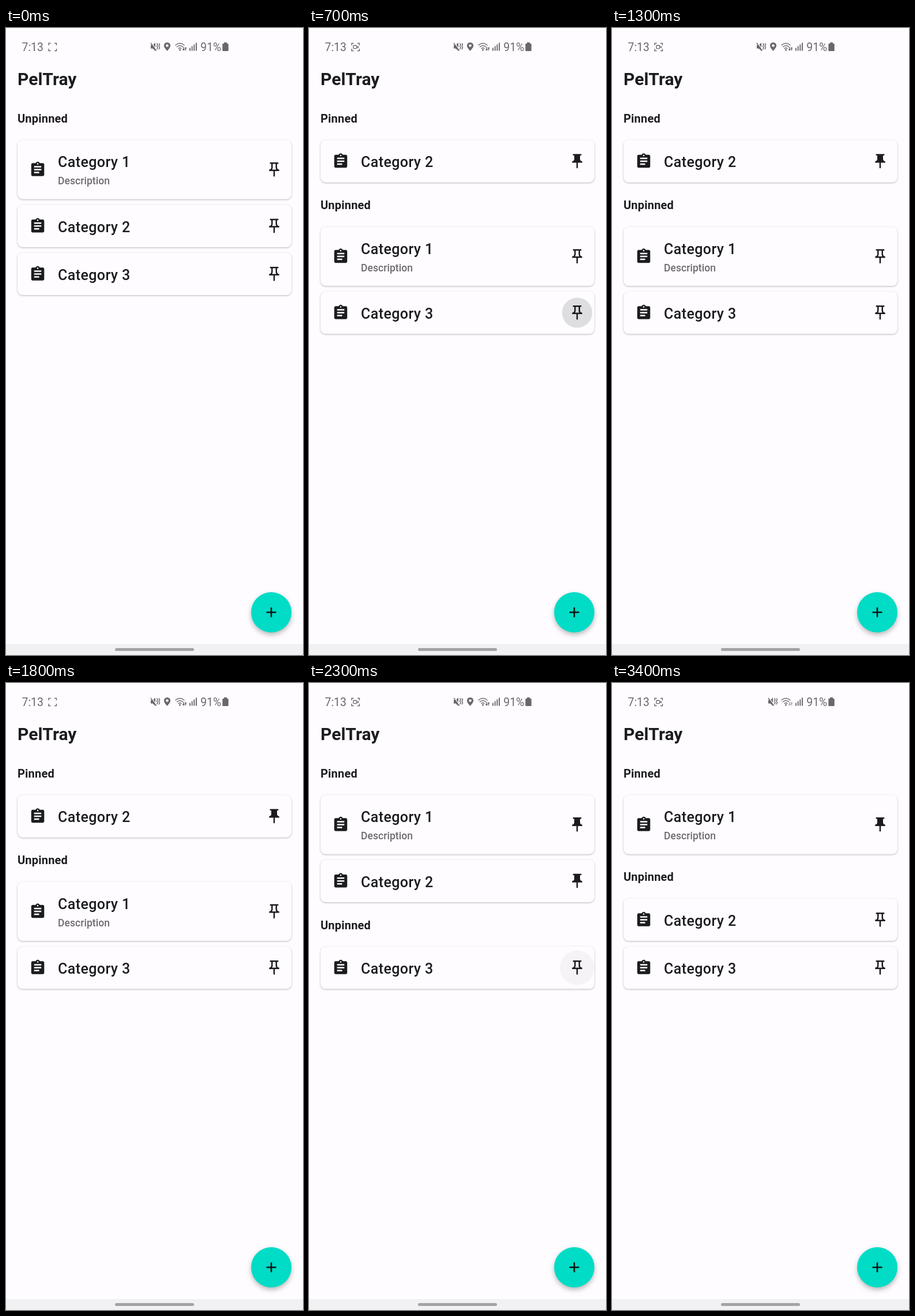
Write an HTML page that moves like this. It is 515 px wide and 1087 px high and loops after 3.8 s.

```html
<!DOCTYPE html>
<html lang="en">
<head>
<meta charset="utf-8">
<title>Pinned cards</title>
<style>
  html, body { margin: 0; width: 100%; height: 100%; overflow: hidden; background: #fefcff; }
  svg { display: block; width: 100vw; height: 100vh; font-family: Roboto, sans-serif; fill: #1c1b1f; }
  .status { fill: #69676b; font-size: 19.3px; }
  .line { fill: none; stroke: #69676b; stroke-width: 1.4; }
  .title { font-size: 30px; font-weight: 700; }
  .head { font-size: 20px; font-weight: 700; letter-spacing: .2px; }
  .name { font-size: 25px; font-weight: 500; letter-spacing: .4px; }
  .desc { font-size: 17.5px; font-weight: 500; fill: #6d6b70; letter-spacing: .05px; }
  .card { fill: #fefcff; filter: drop-shadow(0 1.3px 1.6px rgba(0, 0, 0, .28)); }
  .fab { fill: #00dcc6; filter: drop-shadow(0 4px 4px rgba(0, 0, 0, .27)); }
</style>
</head>
<body>
<svg viewBox="0 0 515 1087" preserveAspectRatio="none">
  <defs>
    <path id="clip" d="M19 3h-4.18C14.4 1.84 13.3 1 12 1s-2.4.84-2.82 2H5c-1.1 0-2 .9-2 2v14c0 1.1.9 2 2 2h14c1.1 0 2-.9 2-2V5c0-1.1-.9-2-2-2zm-7 0c.55 0 1 .45 1 1s-.45 1-1 1-1-.45-1-1 .45-1 1-1zm2 14H7v-2h7v2zm3-4H7v-2h10v2zm0-4H7V7h10v2z"/>
    <path id="pin" d="M16 9V4h1c.55 0 1-.45 1-1s-.45-1-1-1H7c-.55 0-1 .45-1 1s.45 1 1 1h1v5c0 1.66-1.34 3-3 3v2h5.97v7l1 1 1-1v-7H19v-2c-1.66 0-3-1.34-3-3z"/>
    <g id="unpin">
      <use href="#pin"/>
      <path fill="#fefcff" d="M14 4v5c0 1.12.37 2.16 1 3H9c.65-.86 1-1.9 1-3V4z"/>
    </g>
  </defs>

  <g class="status">
    <text x="27.6" y="39.8">7:13</text>
    <path class="line" d="M74 30v-3.5h3.5M84 26.5h3.5v3.5M74 36v3.5h3.5M84 39.5h3.5v-3.5"/>
    <g id="camera">
      <rect class="line" x="77" y="30.2" width="5.6" height="5.4" rx="1"/>
      <path d="M83 33l2.8-2.4v4.8z"/>
    </g>
    <g id="mute">
      <path d="M251 29.5h3.4l4.6-4v14.2l-4.6-4.2h-3.4z"/>
      <path d="M252 25l9 14" stroke="#fefcff" stroke-width="2"/>
      <path class="line" d="M251 26l9.5 13.5M261.5 26.5l1.6 2.4-1.6 2.6 1.6 2.6-1.6 3M265 26.5l1.6 2.4-1.6 2.6 1.6 2.6-1.6 3"/>
    </g>
    <path id="place" fill-rule="evenodd" d="M279.5 40c-3-4-5.6-6.500-5.600-9.500a5.600 5.600 0 0 1 11.200 0c0 3-2.600 5.500-5.600 9.500zM279.500 28.200a2.300 2.300 0 1 0 .01 0z"/>
    <path class="line" d="M293.500 30q8-7 16 0M296 33q5.500-5 11 0M298.700 35.800q2.800-2.500 5.600 0"/>
    <circle cx="301.500" cy="38" r="1.500"/>
    <path id="arrows" class="line" d="M308 33v5.500m-1.600-1.800l1.600 1.800 1.600-1.800M311.500 39v-5m-1.300 1.500l1.300-1.500 1.300 1.500"/>
    <path d="M318 39.500v-5h1.900v5zM321.700 39.500v-8h1.900v8zM325.400 39.500v-11h1.900v11zM329.100 39.500v-14h1.900v14z"/>
    <text x="337.300" y="39.800">91%</text>
    <path d="M378 25h5v2h1.500q1.200 0 1.200 1.200v10.600q0 1.200-1.200 1.200h-8q-1.200 0-1.200-1.200v-10.600q0-1.200 1.200-1.200h1.500z"/>
  </g>

  <text class="title" x="20" y="99">PelTray</text>
  <g id="list"></g>
  <circle class="fab" cx="460" cy="1013" r="35"/>
  <path d="M451.500 1013h17M460 1004.500v17" stroke="#0b1413" stroke-width="2.600"/>
  <path d="M0 1068h515v19H0z" fill="#f1f0f2"/>
  <rect x="189" y="1075" width="137" height="5" rx="2.500" fill="#a3a2a4"/>
</svg>

<script>
const LOOP = 3800, STEP = 100;
const $ = id => document.getElementById(id);

// Pinned categories from each moment on
const states = [[0, ''], [700, '2'], [2000, '12'], [3100, '1']];
// Ripples: press time, first and last visible moment, category
const taps = [
  { press: 602, from: 700, to: 1000, id: '3' },
  { press: 1967, from: 2000, to: 2800, id: '3' },
  { press: 2955, from: 3000, to: 3100, id: '2' }
];

// cubic-bezier(.4, 0, .2, 1)
function ease(x) {
  let lo = 0, hi = 1, u;
  for (let i = 0; i < 24; i++) {
    u = (lo + hi) / 2;
    const bx = 1.2 * u * (1 - u) ** 2 + .6 * u * u * (1 - u) + u ** 3;
    if (bx < x) lo = u; else hi = u;
  }
  return u * u * (3 - 2 * u);
}

function ripple(id, cy, t) {
  const tap = taps.find(p => p.id === id && t >= p.from && t < p.to);
  if (!tap) return '';
  const age = Math.min(t - tap.press, 333);
  const r = 18 + 12 * ease(Math.min(1, age / 225));
  const alpha = .125 * (1 - Math.max(0, age - 225) / 150);
  return `<circle cx="465" cy="${cy}" r="${r}" fill="#000" fill-opacity="${alpha}"/>`;
}

function card(id, y, h, pinned, t) {
  const cy = y + h / 2;
  const icon = (name, x) => `<use href="#${name}" transform="translate(${x} ${cy - 15}) scale(1.25)"/>`;
  return `<rect class="card" x="20" y="${y}" width="475" height="${h}" rx="9"/>
    ${icon('clip', 40)}
    <text class="name" x="90" y="${y + 47}">Category ${id}</text>
    ${id === '1' ? `<text class="desc" x="90" y="${y + 77}">Description</text>` : ''}
    ${icon(pinned ? 'pin' : 'unpin', 450)}${ripple(id, cy, t)}`;
}

function list(t) {
  const pins = states.filter(s => t >= s[0]).pop()[1];
  let y = 164, out = '';
  for (const pinned of [true, false]) {
    const ids = [...'123'].filter(id => pins.includes(id) === pinned);
    if (!ids.length) continue;
    out += `<text class="head" x="20" y="${y}">${pinned ? 'Pinned' : 'Unpinned'}</text>`;
    y += 30.3;
    for (const id of ids) {
      const h = id === '1' ? 102.4 : 73.4;
      out += card(id, y, h, pinned, t);
      y += h + 9.8;
    }
    y += 36.9;
  }
  return out;
}

function draw(t) {
  const located = t < 3000;
  $('list').innerHTML = list(t);
  $('camera').style.display = t % 1000 >= 300 && t % 1000 < 800 ? '' : 'none';
  $('place').style.display = located ? '' : 'none';
  $('mute').setAttribute('transform', `translate(${located ? 0 : 20})`);
  $('arrows').style.opacity = located ? 1 : .6;
}

let start, shown;
function tick(now) {
  start ??= now;
  const t = Math.floor((now - start) % LOOP / STEP) * STEP;
  if (t !== shown) draw(shown = t);
  requestAnimationFrame(tick);
}
draw(0);
requestAnimationFrame(tick);
</script>
</body>
</html>
```
